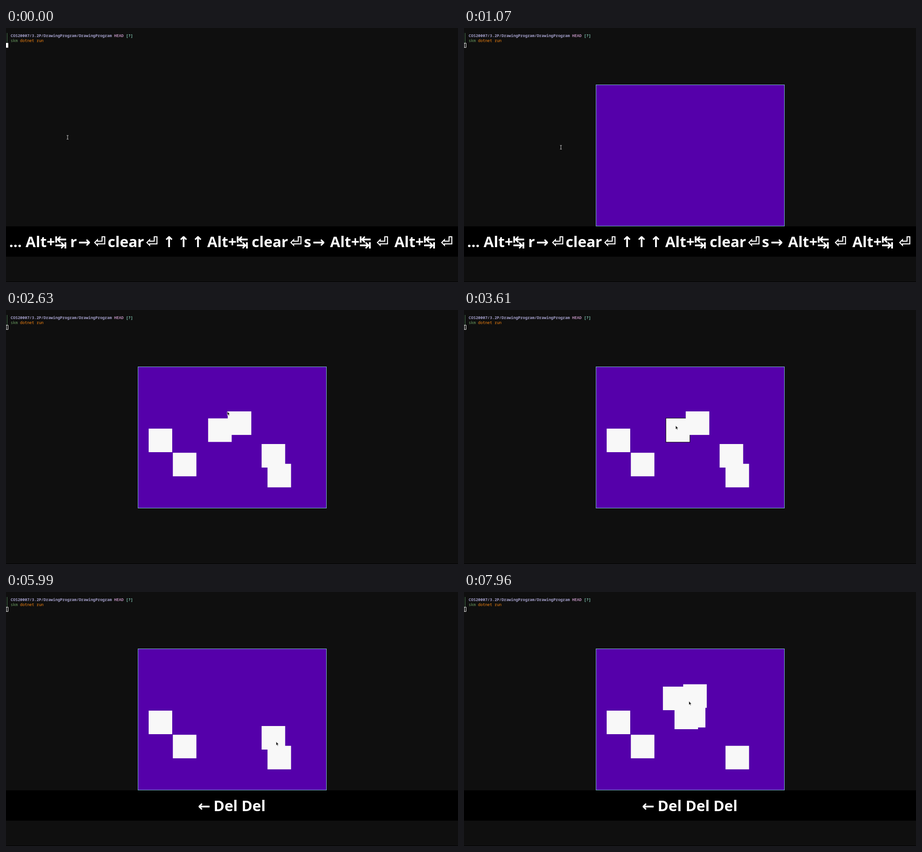
An HTML page that plays this animation: 998 px wide and 561 px high, repeating every 8 s.

```html
<!DOCTYPE html>
<html lang="en">
<head>
<meta charset="utf-8">
<title>Drawing program</title>
<style>
  html, body { margin: 0; width: 100%; height: 100%; overflow: hidden; background: #0f0f0f; }
  svg { display: block; width: 998px; height: 561px; }
  .term { font: 8.67px "Noto Sans Mono", monospace; white-space: pre; }
  .bold { font-weight: 700; }
  #banner {
    position: absolute; left: 0; top: 438px; width: 998px; height: 67px;
    background: #000; color: #fff; text-align: center; white-space: pre;
    font: 700 32.5px/67px "Noto Sans", "Open Sans", sans-serif;
  }
  #banner:empty { display: none; }
  #banner span {
    display: inline-flex; justify-content: center; width: 25px;
    font: 700 33px/1 "DejaVu Sans", sans-serif;
  }
  #banner .⏎ { width: 35px; }
  #banner .→ { width: 33px; }
  #banner .↑ { width: 23.5px; }
</style>
</head>
<body>
<svg viewBox="0 0 998 561">
  <rect width="998" height="561" fill="#0f0f0f"/>
  <rect y="560" width="998" height="1" fill="#000"/>
  <path d="M2.5 11V33" stroke="#4c7a55"/>
  <text class="term bold" x="10.3" y="19.5" fill="#a09cc6">COS20007/3.2P/DrawingProgram/DrawingProgram<tspan fill="#b48ab4"> HEAD</tspan><tspan fill="#7fc4b0"> [?]</tspan></text>
  <text class="term" x="10.3" y="31" fill="#6da063">skm<tspan fill="#f58410"> dotnet run</tspan></text>
  <rect id="caret" x=".5" y="33.5" width="4" height="9.5" stroke="#fff"/>
  <g id="window">
    <rect x="291.5" y="125.5" width="416" height="312" fill="#5500aa" stroke="#7cc0cf"/>
    <g id="squares"></g>
  </g>
  <g id="mouse">
    <path id="beam" d="M-2 -4.2H-.6L0 -3.6L.6 -4.2H2M0 -3.6V3.6M-2 4.2H-.6L0 3.6L.6 4.2H2" fill="none" stroke="#d8d8d8"/>
    <path id="arrow" d="M0 0V8.6L2 6.8L3.4 9.8L4.8 9.2L3.4 6.3H6Z" fill="#111" stroke="#f4f4f4" stroke-width=".8" stroke-linejoin="round"/>
  </g>
</svg>
<div id="banner"></div>
<script>
const LOOP = 8000, WINDOW_OPEN = 1000, CAPTION_END = 1850;
const SIDE = 52, RIM = 1.04;
const FIRST_CAPTION = "… Alt+↹ r→⏎clear⏎ ↑ ↑ ↑ Alt+↹ clear⏎s→ Alt+↹ ⏎ Alt+↹ ⏎";
const $ = id => document.getElementById(id);

// The session: time, pointer position and what is done there
const steps = [
  [0, 136, 241.5], [300, 235, 211], [520, 319, 235], [800, 262, 270], [1070, 214, 263.5],
  [1480, 446.3, 239.4, "place"],
  [1690, 564.4, 296, "place"],
  [1830, 577.4, 339.7, "place"],
  [1980, 550.5, 336],
  [2160, 368.4, 315.3, "place"],
  [2340, 315, 262, "place"],
  [2600, 489.6, 223.9, "place"],
  [3000, 429, 236],
  [3500, 467, 255, "pick"],
  [4400, 468, 256, "←"],
  [4680, 490, 259, "Del"],
  [5150, 509, 260, "pick"],
  [5450, 509, 260, "Del"],
  [6020, 597, 331, "pick"],
  [6320, 597, 329, "Del"],
  [6660, 566, 291],
  [6900, 484, 203.8, "place"],
  [7130, 439.2, 209, "place"],
  [7400, 464.8, 251, "place"],
  [7590, 481, 247.2, "place"],
  [7960, 496.5, 241], [LOOP, 496.5, 241]
];

// Squares and typed keys after all steps up to time t
function replay(t) {
  let squares = [], keys = [];
  for (const [time, x, y, action] of steps) {
    if (time > t || !action) continue;
    if (action === "place") squares.push({ x, y });
    else if (action === "pick") {
      const hit = squares.findLast(s => x >= s.x && x < s.x + SIDE && y >= s.y && y < s.y + SIDE);
      if (hit) hit.picked = true;
    } else {
      keys.push(action);
      if (action === "Del") squares = squares.filter(s => !s.picked);
    }
  }
  return { squares, caption: t < CAPTION_END ? FIRST_CAPTION : keys.join(" ") };
}

const box = (x, y, side, fill) =>
  `<rect x="${x}" y="${y}" width="${side}" height="${side}" fill="${fill}"/>`;

const square = ({ x, y, picked }) =>
  (picked ? box(x - RIM, y - RIM, SIDE + 2 * RIM, "#000") : "") + box(x, y, SIDE, "#f8f8f8");

// Velocity at a step, zero where the pointer turns back
function slope(i, axis) {
  if (!i || i === steps.length - 1) return 0;
  const rate = j => (steps[j + 1][axis] - steps[j][axis]) / (steps[j + 1][0] - steps[j][0]);
  const before = rate(i - 1), after = rate(i);
  return before * after > 0 ? 2 * before * after / (before + after) : 0;
}

function pointer(t, axis) {
  const i = steps.findIndex(s => s[0] > t), a = steps[i - 1], b = steps[i];
  const span = b[0] - a[0], u = (t - a[0]) / span;
  return a[axis] + (b[axis] - a[axis]) * u * u * (3 - 2 * u)
    + span * u * (1 - u) * (slope(i - 1, axis) * (1 - u) - slope(i, axis) * u);
}

const show = (id, on) => $(id).setAttribute("visibility", on ? "visible" : "hidden");

function update(id, html) {
  const node = $(id);
  if (node.shown !== html) node.innerHTML = node.shown = html;
}

function draw(t) {
  const { squares, caption } = replay(t);
  update("squares", squares.map(square).join(""));
  update("banner", caption.replace(/[←-⏎]/g, sign => `<span class="${sign}">${sign}</span>`));

  const open = t >= WINDOW_OPEN;
  show("window", open);
  $("caret").setAttribute("fill", open ? "none" : "#fff");

  const x = pointer(t, 1), y = pointer(t, 2), inside = open && x > 291;
  $("mouse").setAttribute("transform", `translate(${x} ${y})`);
  show("beam", !inside);
  show("arrow", inside);
}

const begin = performance.now();
function tick() {
  draw((performance.now() - begin) % LOOP);
  requestAnimationFrame(tick);
}
tick();
</script>
</body>
</html>
```
